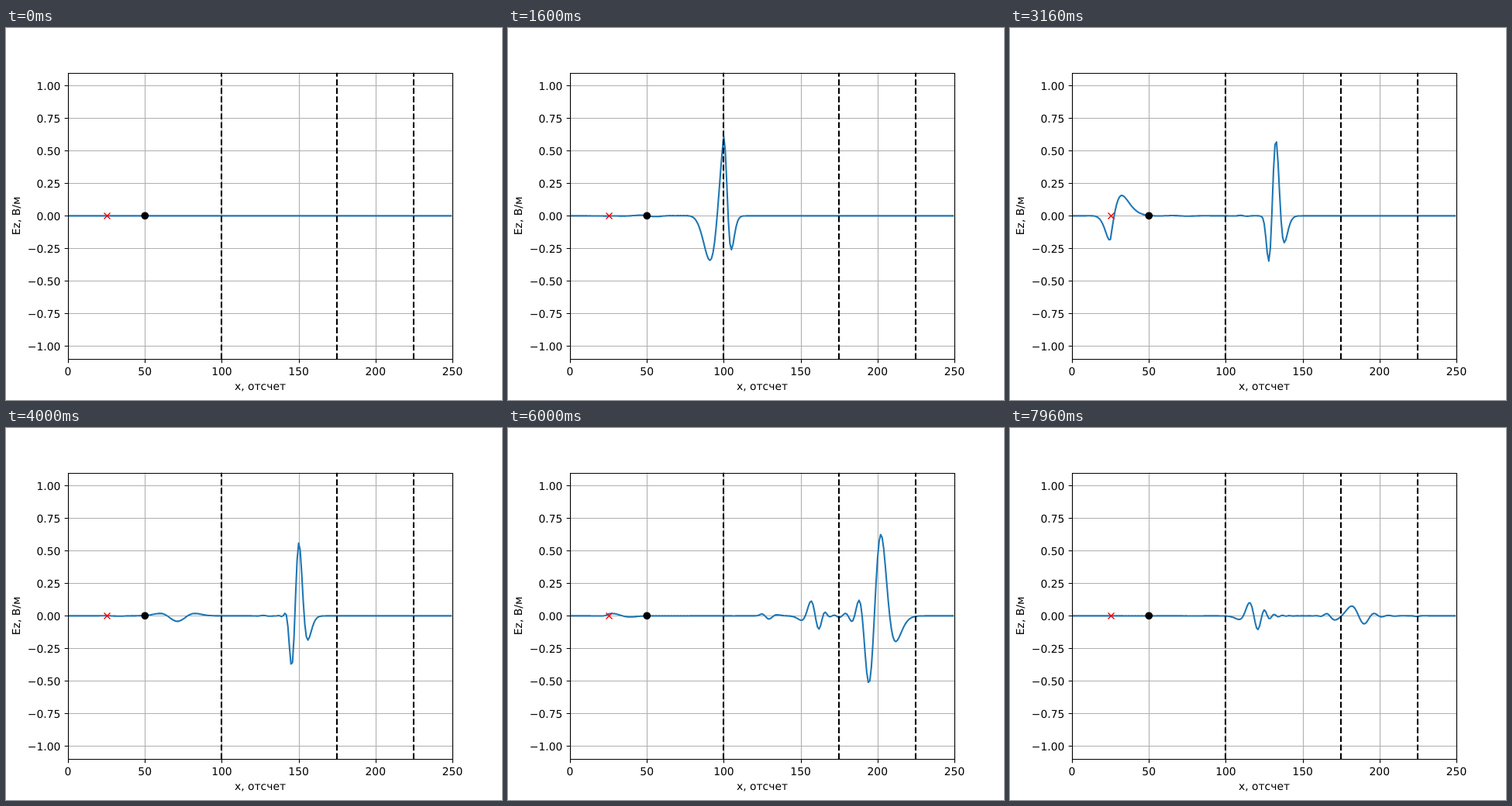
Write an HTML page that moves like this. It is 640 by 480 pixels and loops after 8000 ms.

```html
<!DOCTYPE html>
<html lang="ru">
<head>
<meta charset="utf-8">
<style>
  html, body { margin: 0; width: 100%; height: 100%; overflow: hidden; background: #fff; }
  svg { display: block; width: 640px; height: 480px; }
  text { font: 13.889px "DejaVu Sans", sans-serif; text-rendering: geometricPrecision; }
  .middle { text-anchor: middle; }
  .end { text-anchor: end; }
  path { fill: none; stroke: #000; stroke-width: 1.11; }
  #grid { stroke: #b0b0b0; }
  #field { stroke: #1f77b4; stroke-width: 2.08; stroke-linejoin: round; stroke-linecap: square; }
  #layers { stroke-width: 2.08; stroke-dasharray: 7.708 3.333; }
  #probe { stroke: #f00; stroke-width: 1.39; }
  #spines { stroke-linecap: square; }
</style>
</head>
<body>
<svg viewBox="0 0 640 480">
  <clipPath id="axes"><rect x="80" y="57.6" width="496" height="369.6"/></clipPath>
  <g clip-path="url(#axes)">
    <path id="grid"/>
    <path id="field"/>
  </g>
  <path id="probe" d="M126.5 238.5l8 8m0-8l-8 8"/>
  <circle cx="179.3" cy="242.3" r="4.86"/>
  <path id="layers" clip-path="url(#axes)"/>
  <path id="ticks"/>
  <path id="spines" d="M80.5 58.5H576.5V427.5H80.5Z"/>
  <g id="labels"></g>
  <text class="middle" x="328" y="467">x, отсчет</text>
  <text class="middle" transform="translate(18 242.4) rotate(-90)">Ez, В/м</text>
</svg>
<script>
const SIZE = 250, SOURCE = 50, FRAMES = 200, FRAME_MS = 40, STEPS_PER_FRAME = 2;
const byId = id => document.getElementById(id);
const px = x => 80 + x * 1.984;
const py = y => 242.4 - y * 168;
const crisp = v => Math.floor(v + 0.5) + 0.5;

function drawAxes() {
  let grid = '', ticks = '', labels = '';
  for (let x = 0; x <= 250; x += 50) {
    const p = crisp(px(x));
    grid += `M${p} 57.6V427.2`;
    ticks += `M${p} 427.5v4.86`;
    labels += `<text class="middle" x="${px(x)}" y="448">${x}</text>`;
  }
  for (let y = -1; y <= 1; y += 0.25) {
    const p = crisp(py(y));
    grid += `M80 ${p}H576`;
    ticks += `M80.5 ${p}h-4.86`;
    labels += `<text class="end" x="70.3" y="${py(y) + 5.3}">${y.toFixed(2).replace('-', '\u2212')}</text>`;
  }
  byId('grid').setAttribute('d', grid);
  byId('ticks').setAttribute('d', ticks);
  byId('labels').innerHTML = labels;
  byId('layers').setAttribute('d',
    [100, 175, 225].map(x => `M${Math.round(px(x))} 427.2V57.6`).join(''));
}

// Ricker pulse, 30 time steps per wavelength, delayed by one wavelength
function ricker(t) {
  const a = (Math.PI * (t / 30 - 1)) ** 2;
  return (1 - 2 * a) * Math.exp(-a);
}

const permittivity = i => i < 100 || i >= 225 ? 1 : i < 175 ? 5.5 : 2.3;
const loss = i => i < 25 || i >= 225 ? 0.2 : 0;

// One-dimensional FDTD with Courant number 1 and H scaled by the wave impedance
function simulate() {
  const E = new Float64Array(SIZE), H = new Float64Array(SIZE), frames = [];
  for (let q = 0; frames.length < FRAMES; q++) {
    for (let i = 0; i < SIZE - 1; i++) {
      const l = loss(i);
      H[i] = (H[i] * (1 - l) + E[i + 1] - E[i]) / (1 + l);
    }
    H[SOURCE - 1] -= ricker(q);
    for (let i = 1; i < SIZE - 1; i++) {
      const l = loss(i);
      E[i] = (E[i] * (1 - l) + (H[i] - H[i - 1]) / permittivity(i)) / (1 + l);
    }
    E[SOURCE] += ricker(q + 0.5);
    if (q % STEPS_PER_FRAME === 0) {
      frames.push('M' + Array.from(E, (e, x) => `${px(x).toFixed(2)} ${py(e).toFixed(2)}`).join('L'));
    }
  }
  return frames;
}

drawAxes();
const frames = simulate();
const start = performance.now();
function render() {
  const index = Math.floor((performance.now() - start) / FRAME_MS) % FRAMES;
  byId('field').setAttribute('d', frames[index]);
  requestAnimationFrame(render);
}
render();
</script>
</body>
</html>
```
